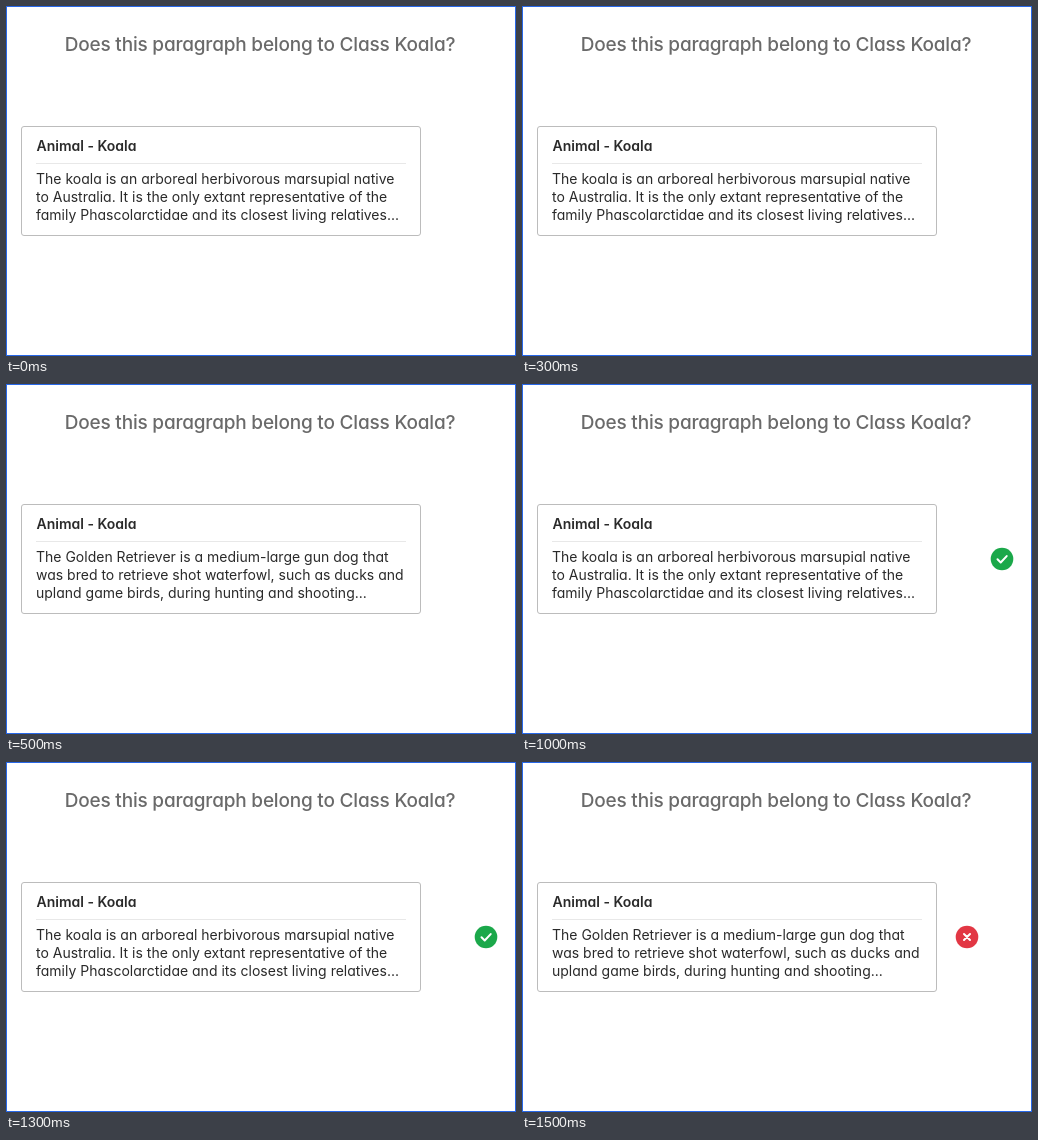
Write an HTML page that moves like this. It is 510x350 px and loops after 2 s.

```html
<!DOCTYPE html>
<html lang="en">
<head>
<meta charset="utf-8">
<title>Paragraph classification</title>
<style>
  html, body { margin: 0; width: 100%; height: 100%; overflow: hidden; background: #fff; }
  svg { display: block; width: 510px; height: 350px; }
  text { font-family: Inter, "Open Sans", sans-serif; font-feature-settings: "cv11"; white-space: pre; }
  .title { font-size: 19px; font-weight: 500; letter-spacing: -.2px; fill: #6a6a6a; text-anchor: middle; }
  .label { font-size: 14px; font-weight: 600; fill: #2a2a2a; }
  .body text { font-size: 14px; fill: #2a2a2a; }
  .mark { fill: none; stroke: #fff; stroke-width: 2; stroke-linecap: round; stroke-linejoin: round; }
</style>
</head>
<body>
<svg viewBox="0 0 510 350">
  <rect x=".5" y=".5" width="509" height="349" fill="#fff" stroke="#2868e8"/>
  <text class="title" x="254" y="45">Does this paragraph belong to Class Koala?</text>

  <rect x="15.5" y="120.5" width="399" height="109" rx="2.5" fill="#fff" stroke="#bcbcbc"/>
  <text class="label" x="30.5" y="145">Animal - Koala</text>
  <path d="M30 157.5H400" stroke="#e8e8e8"/>

  <g class="body" id="koala">
    <text x="30" y="178">The koala is an arboreal herbivorous marsupial native</text>
    <text x="30" y="196">to Australia. It is the only extant representative of the</text>
    <text x="30" y="214">family Phascolarctidae and its closest living relatives...</text>
  </g>
  <g class="body" id="retriever">
    <text x="30" y="178">The Golden Retriever is a medium-large gun dog that</text>
    <text x="30" y="196">was bred to retrieve shot waterfowl, such as ducks and</text>
    <text x="30" y="214">upland game birds, during hunting and shooting...</text>
  </g>

  <g id="yes">
    <circle cx="480" cy="175" r="11.3" fill="#1ba84a"/>
    <path class="mark" d="M475.5 175.3l3.2 3.2 6-6.4"/>
  </g>
  <g id="no">
    <circle cx="445" cy="175" r="11.3" fill="#e23744"/>
    <path class="mark" d="M442 172l6 6m0-6l-6 6"/>
  </g>
</svg>
<script>
  // Visibility of each part in the four equal steps of the loop
  const steps = {
    koala:     [1, 0, 1, 0],
    retriever: [0, 1, 0, 1],
    yes:       [0, 0, 1, 0],
    no:        [0, 0, 0, 1]
  };

  for (const [id, shown] of Object.entries(steps)) {
    const frames = [...shown, shown[3]].map((opacity, i) => ({ opacity, offset: i / 4, easing: 'step-end' }));
    const anim = document.getElementById(id).animate(frames, { duration: 2000, iterations: Infinity });
    anim.startTime = 0;
  }
</script>
</body>
</html>
```
